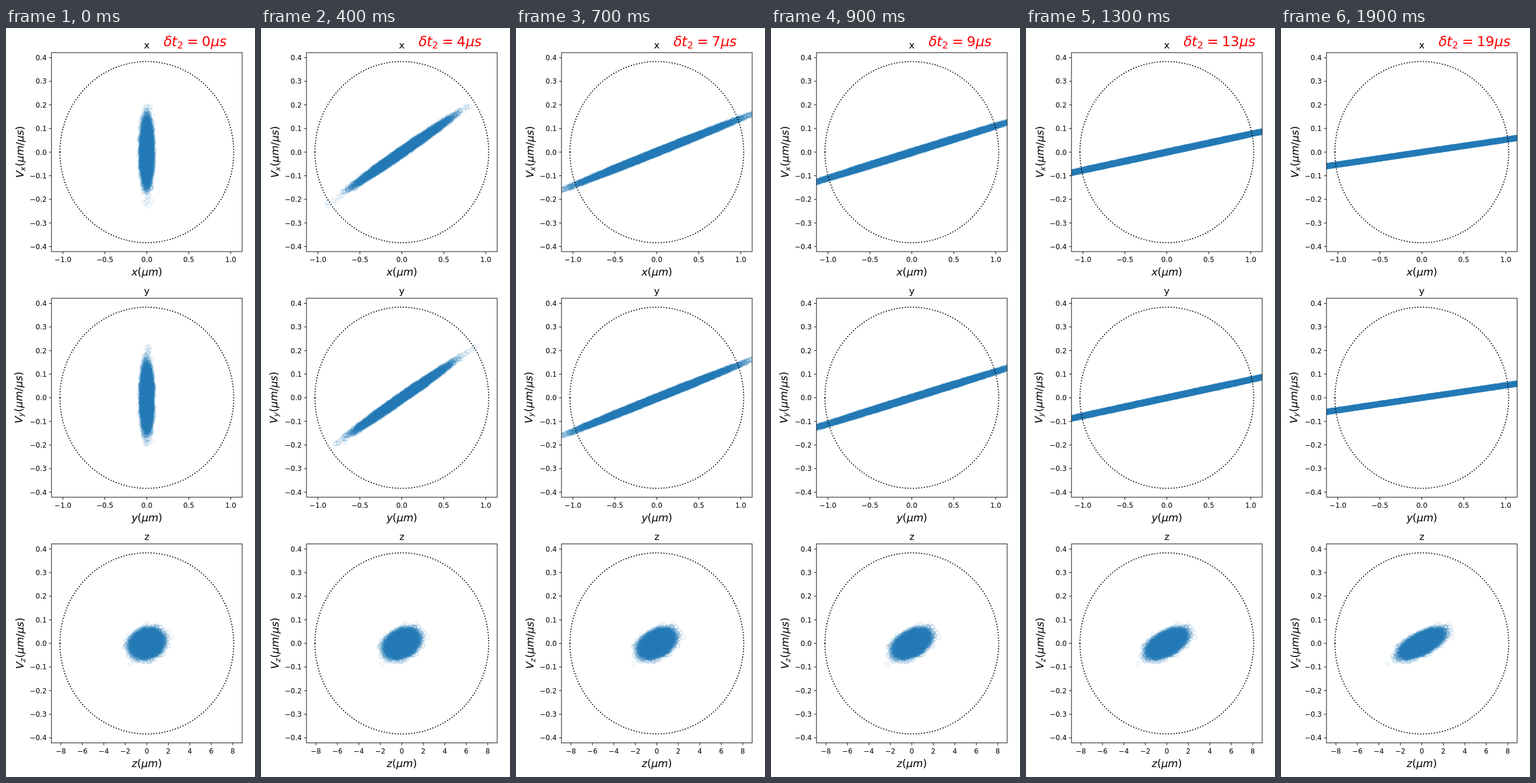
These frames come from a looping animation (427 px wide and 1280 px high, 2 s). An HTML page with a canvas:

```html
<!DOCTYPE html>
<html lang="en">
<head>
<meta charset="utf-8">
<title>Phase space expansion</title>
<style>
  html, body { margin: 0; width: 100%; height: 100%; overflow: hidden; background: #fff; }
  canvas { display: block; }
</style>
</head>
<body>
<canvas id="stage" width="427" height="1280"></canvas>
<script>
const WIDTH = 427, HEIGHT = 1280;
const ctx = document.getElementById('stage').getContext('2d');
const FONT = '"DejaVu Sans", sans-serif';
const PT = 1.186;                       // pixels per point
const CX = 241.5, HALF_W = 163.5, HALF_H = 170, V_SCALE = 403.4;
const COUNT = 20000, STEPS = 20, STEP_MS = 100;

// Extremes are the few far-out particles as [position, velocity].
const panels = [
  { name: 'x', cy: 212.1, scale: 143.9, sx: 0.025, sv: 0.0525, corr: 0, labelX: 30,
    ticks: [-1, -0.5, 0, 0.5, 1], digits: 1,
    extremes: [[0.023, -0.227], [0.059, -0.208], [-0.03, -0.214], [-0.008, -0.216], [0.005, -0.206],
               [0.041, 0.193], [-0.012, 0.196], [0.01, 0.19]] },
  { name: 'y', cy: 631.9, scale: 143.9, sx: 0.025, sv: 0.0525, corr: 0, labelX: 27.5,
    ticks: [-1, -0.5, 0, 0.5, 1], digits: 1,
    extremes: [[0.028, 0.217], [0.005, 0.214], [0.015, 0.208], [0.03, 0.202],
               [-0.008, -0.196], [0.07, -0.188], [-0.02, -0.192]] },
  { name: 'z', cy: 1051.7, scale: 18.42, sx: 0.55, sv: 0.0215, corr: 0.15, labelX: 30,
    ticks: [-8, -6, -4, -2, 0, 2, 4, 6, 8], digits: 0,
    extremes: [[-1.5, -0.0875], [2.3, 0.026], [1.95, 0.045], [-1.75, -0.052], [0.9, 0.083]] }
];

let seed = 12345;
function random() {
  seed = (seed * 1664525 + 1013904223) % 4294967296;
  return seed / 4294967296;
}

function makeCloud({ sx, sv, corr, extremes }) {
  const cloud = [...extremes];
  while (cloud.length < COUNT) {
    const radius = Math.sqrt(-2 * Math.log(0.0007 + 0.9993 * random()));
    const angle = 2 * Math.PI * random();
    const a = radius * Math.cos(angle), b = radius * Math.sin(angle);
    cloud.push([sx * (corr * b + Math.sqrt(1 - corr * corr) * a), sv * b]);
  }
  return cloud;
}
for (const panel of panels) panel.cloud = makeCloud(panel);

function makeLayer(width, height) {
  const layer = document.createElement('canvas');
  layer.width = width;
  layer.height = height;
  return layer.getContext('2d');
}

const ring = makeLayer(11, 11);
ring.strokeStyle = 'rgba(0,0,0,0.2)';
ring.lineWidth = PT;
ring.arc(5.5, 5.5, 3 * PT, 0, 2 * Math.PI);
ring.stroke();

// Rings add up as coverage only; one tint afterwards keeps the blue exact.
const clouds = makeLayer(WIDTH, HEIGHT);

function drawClouds(step) {
  clouds.globalCompositeOperation = 'source-over';
  clouds.clearRect(0, 0, WIDTH, HEIGHT);
  for (const { cy, scale, cloud } of panels) {
    for (const [pos, vel] of cloud) {
      const dx = (pos + vel * step) * scale;
      if (Math.abs(dx) < HALF_W + 6) clouds.drawImage(ring.canvas, CX + dx - 5.5, cy - vel * V_SCALE - 5.5);
    }
  }
  clouds.globalCompositeOperation = 'source-in';
  clouds.fillStyle = '#1f77b4';
  clouds.fillRect(0, 0, WIDTH, HEIGHT);

  ctx.save();
  ctx.beginPath();
  ctx.rect(CX - HALF_W, 0, 2 * HALF_W, HEIGHT);
  ctx.clip();
  ctx.drawImage(clouds.canvas, 0, 0);
  ctx.restore();
}

function plain(text, x, y, size, align) {
  ctx.font = `${size}px ${FONT}`;
  ctx.textAlign = align;
  ctx.fillText(text, x, y);
}

// Math text: letters slanted, "_" lowers the next character, "=" gets extra space.
function math(text, x, y, size, centered) {
  const glyphs = [];
  let width = 0, sub = false;
  for (const char of text) {
    if (char === '_') { sub = true; continue; }
    const em = sub ? size * 0.7 : size;
    const pad = char === '=' ? size * 0.23 : 0;
    ctx.font = `${em}px ${FONT}`;
    glyphs.push({ char, em, at: width + pad, drop: sub ? size * 0.16 : 0 });
    width += ctx.measureText(char).width + 2 * pad + (sub ? size * 0.04 : 0);
    sub = false;
  }
  const left = centered ? x - width / 2 : x;
  for (const { char, em, at, drop } of glyphs) {
    const slanted = /\p{L}/u.test(char);
    ctx.save();
    ctx.translate(left + at, y + drop);
    if (slanted) ctx.transform(1, 0, -0.2, 1, 0, 0);
    plain(char, slanted ? -0.045 * em : 0, 0, em, 'left');
    ctx.restore();
  }
}

const tickText = (value, digits) => value.toFixed(digits).replace('-', '\u2212');

function drawAxes({ name, cy, scale, ticks, digits, labelX }) {
  const left = CX - HALF_W, top = cy - HALF_H, bottom = cy + HALF_H;

  ctx.strokeStyle = ctx.fillStyle = '#000';
  ctx.lineWidth = 1.5 * PT;
  ctx.setLineDash([1.5 * PT, 2.475 * PT]);
  ctx.beginPath();
  ctx.ellipse(CX, cy, 149, 154.8, 0, -Math.PI, Math.PI);
  ctx.stroke();
  ctx.setLineDash([]);

  ctx.lineWidth = 0.8 * PT;
  ctx.strokeRect(left, top, 2 * HALF_W, 2 * HALF_H);
  const tickSize = 10 * PT, tickLength = 3.5 * PT;
  ctx.beginPath();
  for (const value of ticks) {
    const x = CX + value * scale;
    ctx.moveTo(x, bottom);
    ctx.lineTo(x, bottom + tickLength);
    plain(tickText(value, digits), x, bottom + 18.1, tickSize, 'center');
  }
  for (let i = -4; i <= 4; i++) {
    const y = cy - i / 10 * V_SCALE;
    ctx.moveTo(left, y);
    ctx.lineTo(left - tickLength, y);
    plain(tickText(i / 10, 1), left - 2 * tickLength, y + 4.4, tickSize, 'right');
  }
  ctx.stroke();

  plain(name, CX, top - 7, 14 * PT, 'center');
  math(`${name}(μm)`, CX, bottom + 41, 15 * PT, true);
  ctx.save();
  ctx.translate(labelX, cy);
  ctx.rotate(-Math.PI / 2);
  math(`V_${name}(μm/μs)`, 0, 0, 15 * PT, true);
  ctx.restore();
}

function draw(step) {
  ctx.fillStyle = '#fff';
  ctx.fillRect(0, 0, WIDTH, HEIGHT);
  drawClouds(step);
  panels.forEach(drawAxes);
  ctx.fillStyle = '#f00';
  math(`δt_2=${step}μs`, 269.6, 31, 20 * PT, false);
}

let shown = -1;
function tick() {
  const step = Math.floor(performance.now() / STEP_MS) % STEPS;
  if (step !== shown) draw(shown = step);
  requestAnimationFrame(tick);
}
tick();
</script>
</body>
</html>
```
